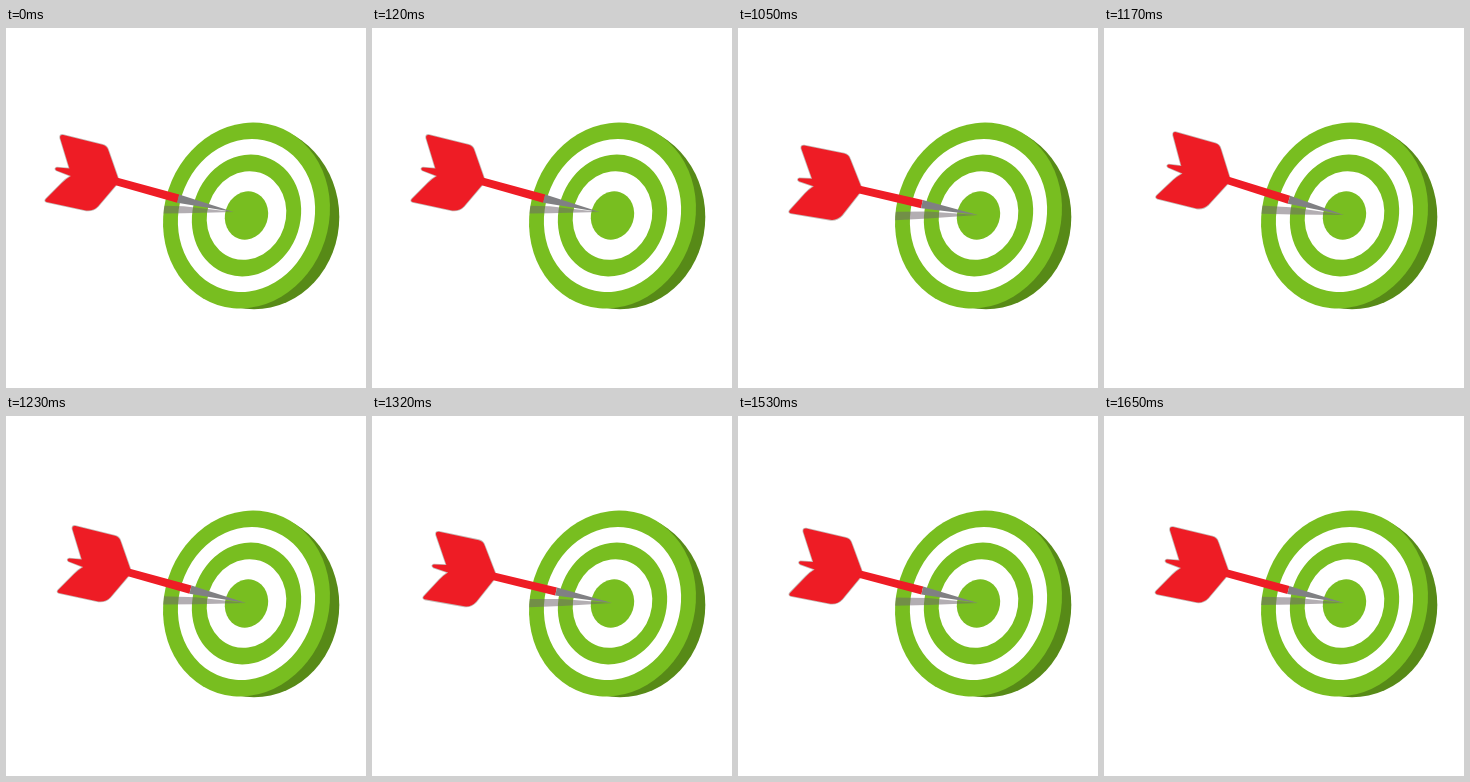
An HTML page with a canvas for the animation above (9000 ms loop, 360x360 px).

```html
<!DOCTYPE html>
<html>
<head>
<meta charset="utf-8">
<style>
html, body { margin: 0; width: 100%; height: 100%; overflow: hidden; background: #fff; }
canvas { display: block; }
</style>
</head>
<body>
<canvas id="stage" width="360" height="360"></canvas>
<script>
const ctx = document.getElementById('stage').getContext('2d');
const GREEN = '#78be20', DARK = '#578a17', RED = '#ee1c25', STEEL = '#808083';
const LOOP = 9000, STEP = 30;
const START = 840, HIT = 967, REST = 1650, PERIOD = 270, PEAK = 1170;
const TIP = [240, 187], START_ANGLE = 0.35;

const feathers = new Path2D(
  'M69 111 L108.5 120.5 Q112.8 121.5 114.2 126 L123.8 153 Q124.8 157 122 161 ' +
  'L104.3 182 Q99.3 187.2 92.5 186.3 L53 178.2 Q50.3 177.2 52.2 175.1 L68 159 Q72 155 77 152 ' +
  'L62.5 146.5 Q60 144.5 63 143.6 L75.5 144.5 L66 114 Q65.5 110.5 69 111 Z');
const shaft = new Path2D('M121 152.8 L185.4 169.9 L183.4 178 L120 160.4 Z');
const point = new Path2D('M185.4 169.9 L240 187 L183.4 178 Z');
const shadow = new Path2D('M140 180.3 L190 181.6 L240 187 L190 188.6 L140 189.2 Z');

function oval(x, y, rx, ry, tilt) {
  const path = new Path2D();
  path.ellipse(x, y, rx, ry, tilt, 0, 2 * Math.PI);
  return path;
}

const disc = scale => oval(240.5, 187.5, 82.3 * scale, 94 * scale, Math.PI / 10);
const back = oval(248, 189, 85.3, 92.2, 0);
const face = disc(1);
const rings = [0.822, 0.655, 0.477, 0.26].map(disc);

function fill(path, color) {
  ctx.fillStyle = color;
  ctx.fill(path);
}

function drawTarget() {
  fill(back, DARK);
  fill(face, GREEN);
  rings.forEach((ring, i) => fill(ring, i % 2 ? GREEN : '#fff'));
}

// Drives in with acceleration, then wobbles around the tip and settles.
function pose(t) {
  if (t >= REST) return { out: 0, angle: 0 };
  if (t < HIT) {
    const u = Math.max(0, (t - START) / (HIT - START));
    const out = 1 - u ** 3;
    return { out, angle: START_ANGLE * out };
  }
  const swing = 2.3 * Math.min(1, Math.exp((PEAK - t) / 480));
  return { out: 0, angle: swing * Math.cos(2 * Math.PI * (t - PEAK) / PERIOD) };
}

function place({ out, angle }) {
  const [x, y] = TIP;
  ctx.translate(x - 12.3 * out, y - 3 * out);
  ctx.rotate(angle * Math.PI / 180);
  ctx.translate(-x, -y);
}

function drawDart(p) {
  ctx.save();
  ctx.clip(face);
  place(p);
  fill(shadow, 'rgba(110,100,108,0.52)');
  ctx.restore();

  ctx.save();
  place(p);
  ctx.strokeStyle = '#c4b8b4';
  ctx.lineWidth = 1.6;
  ctx.stroke(feathers);
  fill(feathers, RED);
  fill(shaft, RED);
  fill(point, STEEL);
  ctx.restore();
}

function frame(now) {
  const t = Math.floor(now % LOOP / STEP) * STEP;
  ctx.fillStyle = '#fff';
  ctx.fillRect(0, 0, 360, 360);
  drawTarget();
  drawDart(pose(t));
  requestAnimationFrame(frame);
}

requestAnimationFrame(frame);
</script>
</body>
</html>
```
